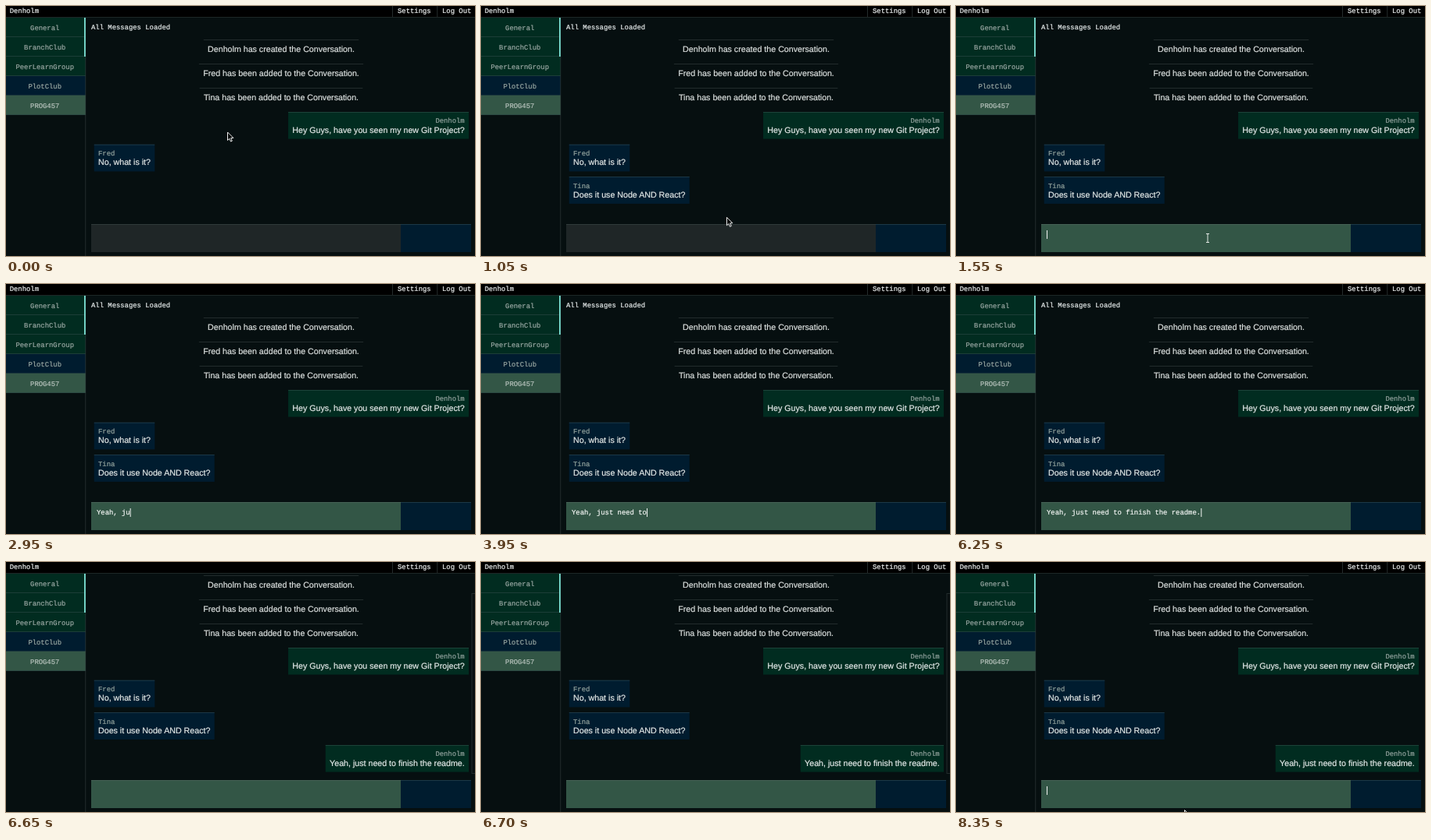
An HTML page with a canvas for the animation above (8.45 s loop, 600 by 321 pixels).

```html
<!DOCTYPE html>
<html lang="en">
<head>
<meta charset="utf-8">
<title>Chat</title>
<style>
html, body { margin: 0; width: 100%; height: 100%; overflow: hidden; background: #060f10; }
canvas { display: block; width: 600px; height: 321px; }
</style>
</head>
<body>
<canvas id="stage" width="600" height="321"></canvas>
<script>
const ctx = document.getElementById("stage").getContext("2d");
ctx.textRendering = "geometricPrecision";
const LOOP = 8450;
// The page is laid out at 2/3 scale: 16px text, 13.33px monospace, 8px padding, 1px rules
const MONO = '8.89px "Liberation Mono", "Courier New", monospace';
const SANS = '10.67px "Liberation Sans", Arial, sans-serif';
const CHAR = 5.333;
const PAD = 5.33;
const RULE = 0.67;
const GREEN = "#012c20", BLUE = "#001c2f", ACTIVE = "#335646";
const DRAFT = "Yeah, just need to finish the readme.";
const ME = "Denholm";

// Event times in ms
const REPLY = 450, FOCUS = 1300, TYPE = 2170, KEY = 97.5, SEND = 6450;
const BAR_GONE = 6850, BLINK = 7350, POINTER_BACK = 7500;

function rect(x, y, w, h, color) {
  ctx.fillStyle = color;
  ctx.fillRect(x, y, w, h);
}

function label(str, x, y, color, font = MONO, align = "left") {
  ctx.font = font;
  ctx.textAlign = align;
  ctx.fillStyle = ctx.strokeStyle = color;
  ctx.fillText(str, x, y);
  // A hairline outline gives the slightly heavier smoothed look
  ctx.lineWidth = 0.22;
  ctx.strokeText(str, x, y);
}

function widthOf(str) {
  ctx.font = SANS;
  return ctx.measureText(str).width;
}

function notice(str, y) {
  const w = widthOf(str) + PAD * 2;
  rect(352 - w / 2, y, w, RULE, "#303b3b");
  label(str, 352, y + 16, "#d9dddc", SANS, "center");
}

function message(name, str, y, mine) {
  const w = widthOf(str) + PAD * 2;
  const x = mine ? 592 - w : 112.7;
  rect(x, y, w, 34.6, mine ? GREEN : BLUE);
  rect(x, y, w, RULE, mine ? "#2a5045" : "#294957");
  const tx = mine ? x + w - PAD : x + PAD;
  const align = mine ? "right" : "left";
  label(name, tx, y + 14.2, "#93a29d", MONO, align);
  label(str, tx, y + 26.5, "#e2e6e5", SANS, align);
}

function conversation(t) {
  ctx.save();
  ctx.beginPath();
  ctx.rect(103, 15, 497, 263);
  ctx.clip();
  if (t >= SEND) ctx.translate(0, -26);
  label("All Messages Loaded", 109, 30.3, "#e6eaea");
  notice(ME + " has created the Conversation.", 43);
  notice("Fred has been added to the Conversation.", 74);
  notice("Tina has been added to the Conversation.", 105);
  message(ME, "Hey Guys, have you seen my new Git Project?", 136, true);
  message("Fred", "No, what is it?", 177.8, false);
  if (t >= REPLY) message("Tina", "Does it use Node AND React?", 219.3, false);
  if (t >= SEND) message(ME, DRAFT, 261, true);
  ctx.restore();

  if (t >= SEND && t < BAR_GONE) {
    rect(595.5, 40, 4.5, 232, "#222c2c");
    rect(596.5, 41, 3.5, 230, "#080f10");
  }
}

function sidebar() {
  const rooms = ["General", "BranchClub", "PeerLearnGroup", "PlotClub", "PROG457"];
  rooms.forEach((room, i) => {
    const y = 15 + i * 25;
    rect(0, y, 102, 25, i === 4 ? ACTIVE : i === 3 ? BLUE : GREEN);
    rect(0, y + 24.2, 102, RULE, "#2b4743");
    label(room, 49.7, y + 16, i === 4 ? "#b4c0ba" : "#98a6a1", MONO, "center");
  });
  rect(101.5, 15, RULE, 306, "#303b3b");
  rect(100, 15, 1.8, 50, "#7be0d3");
}

function header() {
  rect(0, 0, 600, 14, "#000");
  rect(0, 14, 600, RULE, "#2b3434");
  rect(494, 0, RULE, 14, "#364040");
  rect(551.5, 0, RULE, 14, "#364040");
  label(ME, 4.7, 9, "#eef1f1");
  label("Settings", 501, 9, "#eef1f1");
  label("Log Out", 558, 9, "#eef1f1");
}

function caretOn(t, typed) {
  if (t < FOCUS) return false;
  if (t >= SEND) return t >= BLINK && Math.floor((t - BLINK) / 500) % 2 === 0;
  return typed > 0 || Math.floor((t - FOCUS) / 500) % 2 === 0;
}

function composer(t) {
  const top = 280.3;
  rect(109, top, 396, 35.7, t >= FOCUS ? ACTIVE : "#1f2627");
  rect(505, top, 90, 35.7, BLUE);
  rect(109, top, 396, RULE, t >= FOCUS ? "#587467" : "#3c4847");
  rect(505, top, 90, RULE, "#294957");
  const typed = t < SEND
    ? Math.max(0, Math.min(DRAFT.length, Math.floor((t - TYPE) / KEY)))
    : 0;
  label(DRAFT.slice(0, typed), 116, 296.3, "#f2f5f3");
  if (caretOn(t, typed)) rect(116 + typed * CHAR, 288, 1, 11, "#f2f5f3");
}

function glide(t, start, end, from, to) {
  const p = Math.max(0, Math.min(1, (t - start) / (end - start)));
  const e = p * p * (3 - 2 * p);
  return from.map((v, i) => v + (to[i] - v) * e);
}

function arrow(x, y) {
  ctx.beginPath();
  [[0, 0], [0, 10.5], [2.4, 8.3], [4, 12], [5.8, 11.2], [4.2, 7.6], [7.4, 7.4]]
    .forEach(([dx, dy]) => ctx.lineTo(x + dx, y + dy));
  ctx.closePath();
  ctx.fillStyle = "#050808";
  ctx.fill();
  ctx.strokeStyle = "#eef0f0";
  ctx.lineWidth = 1;
  ctx.stroke();
}

function beam(x, y) {
  rect(x - 0.5, y - 5, 1, 10, "#e4e9e6");
  rect(x - 2, y - 6, 4, 1, "#e4e9e6");
  rect(x - 2, y + 5, 4, 1, "#e4e9e6");
}

function pointer(t) {
  if (t >= TYPE && t < POINTER_BACK) return;
  const [x, y] = t < TYPE
    ? glide(t, 600, 1230, [283.5, 162], [322, 298])
    : glide(t, POINTER_BACK, 8100, [322, 298], [292.5, 318.5]);
  if (y > 280 && y < 316) beam(x, y);
  else arrow(x, y);
}

function draw(now) {
  const t = now % LOOP;
  rect(0, 0, 600, 321, "#060f10");
  conversation(t);
  sidebar();
  header();
  composer(t);
  pointer(t);
  requestAnimationFrame(draw);
}
requestAnimationFrame(draw);
</script>
</body>
</html>
```
